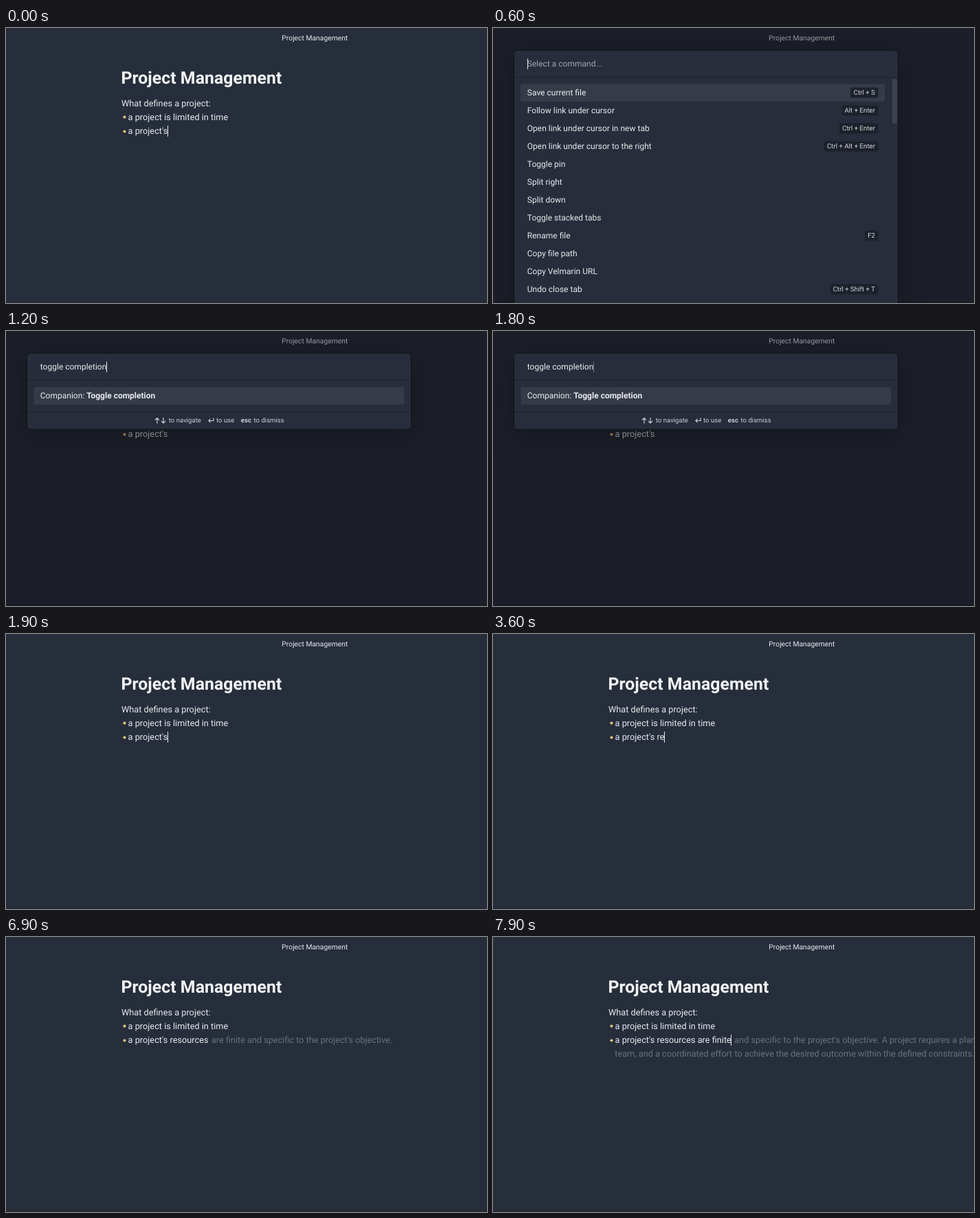
Animation of 700x400 px, one loop 8 s. Source, as an HTML page:

```html
<!DOCTYPE html>
<html lang="en">
<head>
<meta charset="utf-8">
<title>Note editor</title>
<style>
  html, body { margin: 0; width: 700px; height: 400px; overflow: hidden; background: #272e3b; }
  svg { display: block; }
  text { font-family: Roboto, sans-serif; text-rendering: geometricPrecision; white-space: pre; fill: #e8eaee; }
  .body { font-size: 12.75px; }
  .ghost { fill: #6a717e; font-size: 12.7px; }
  .item { font-size: 12.03px; }
  .key { font-size: 9.7px; fill: #d3d6dd; }
  .hint { font-size: 9.6px; fill: #c8ccd4; }
  .box { fill: #272d3a; stroke: #11141b; }
  .rule { stroke: #1d212b; }
  .row { fill: #363b48; }
  .caret { fill: #e8eaee; }
  .arrow { fill: none; stroke: #c9cdd5; stroke-width: 1.2; }
  #palette { filter: drop-shadow(0 8px 22px rgba(0, 0, 0, .25)); }
</style>
</head>
<body>
<svg width="700" height="400" viewBox="0 0 700 400">
  <rect width="700" height="400" fill="#272e3b"/>
  <rect y="398.5" width="700" height="1.5" fill="#212632"/>
  <text x="401.3" y="18.2" font-size="10.35">Project Management</text>
  <text x="167.5" y="81.1" font-size="24.9" font-weight="700" style="fill:#f3f4f6">Project Management</text>
  <g class="body">
    <text x="168" y="114">What defines a project:</text>
    <text x="177.6" y="133.9">a project is limited in time</text>
    <text x="177.6" y="154.4"><tspan id="typed"></tspan><tspan id="ghost" class="ghost" dx="1.3"></tspan></text>
    <text x="177.3" y="173.8" id="ghost2" class="ghost"></text>
  </g>
  <g fill="#dfc37c"><circle cx="172.5" cy="129.6" r="2.1"/><circle cx="172.5" cy="150.5" r="2.1"/></g>
  <rect id="caret" class="caret" y="142" width="1" height="16"/>

  <g id="overlay">
    <rect width="700" height="400" fill="#0a030a" opacity=".35"/>
    <g id="palette">
      <rect id="frame" class="box" x="30.5" y="32.5" width="559" rx="5"/>
      <path class="rule" d="M31 71.5H589"/>
      <text id="query" class="item" x="49.8" y="56.2"></text>
      <rect id="queryCaret" class="caret" y="44.5" width="1" height="15.5"/>
      <g id="all"></g>
      <g id="found">
        <rect class="row" x="40.5" y="81.5" width="539" height="25.5" rx="3"/>
        <text class="item" x="49.8" y="98.2">Companion: <tspan font-weight="700">Toggle completion</tspan></text>
        <path class="rule" d="M31 117.5H589"/>
        <path class="arrow" d="M220 134.5v-8M217 129.5l3-3 3 3M229 126v8M226 131l3 3 3-3M302 126.5v4h-7M297.5 128l-2.5 2.5 2.5 2.5"/>
        <g class="hints"></g>
      </g>
    </g>
  </g>
</svg>
<script>
const $ = id => document.getElementById(id);

const commands = [
  ['Save current file', 'Ctrl + S', 520], ['Follow link under cursor', 'Alt + Enter', 508],
  ['Open link under cursor in new tab', 'Ctrl + Enter', 504],
  ['Open link under cursor to the right', 'Ctrl + Alt + Enter', 482],
  ['Toggle pin'], ['Split right'], ['Split down'], ['Toggle stacked tabs'],
  ['Rename file', 'F2', 541], ['Copy file path'], ['Copy Velmarin URL'],
  ['Undo close tab', 'Ctrl + Shift + T', 491]
];

$('all').innerHTML =
  '<rect class="row" x="40" y="81.5" width="530" height="25.5" rx="3"/>' +
  '<rect x="581" y="74" width="7" height="65" rx="3" fill="#3d424e"/>' +
  commands.map(([name, key, left], i) => {
    const y = 94 + 26 * i;
    return `<text class="item" x="49.8" y="${y + 4.2}">${name}</text>` + (key ?
      `<rect x="${left}" y="${y - 7.5}" width="${560.5 - left}" height="15" rx="3" fill="#1d212b"/>
       <text class="key" x="556" y="${y + 3.2}" text-anchor="end">${key}</text>` : '');
  }).join('');

document.querySelector('.hints').innerHTML =
  [[236.8, 'to navigate'], [306, 'to use'], [341.8, 'esc', 700], [360.5, 'to dismiss']]
    .map(([x, s, w = 400]) => `<text class="hint" x="${x}" y="133.3" font-weight="${w}">${s}</text>`).join('');

// Each track is a list of [start time, value]; values hold until the next start.
const tracks = {
  caret: [[0, 1], [2400, .5], [2500, 0], [3100, 1], [5300, .4], [5400, 0],
    [5900, .6], [6000, 1], [6600, 0], [7100, 1]],
  overlay: [[0, 0], [400, .7], [500, 1], [1900, 0]],
  queryCaret: [[0, 1], [1400, .35]],
  letters: [[0, 0], [3200, 1], [3400, 2], [3500, 3], [3700, 4], [3900, 5], [4100, 6], [4200, 7],
    [4400, 8], [4500, 9], [4800, 10], [7100, 14], [7800, 21]]
};
const at = (name, t) => tracks[name].findLast(([start]) => start <= t)[1];

const start = "a project's";
const sentence = " resources are finite and specific to the project's objective.";
const more = ' A project requires a plan, a dedicated';
const nextLine = 'team, and a coordinated effort to achieve the desired outcome within the defined constraints.';

function draw(t) {
  const n = at('letters', t), long = t >= 7100;
  $('typed').textContent = start + sentence.slice(0, n);
  $('ghost').textContent = t < 6800 ? '' : sentence.slice(n) + (long ? more : '');
  $('ghost2').textContent = long ? nextLine : '';
  const open = at('overlay', t);
  $('caret').setAttribute('x', Math.round(177.3 + $('typed').getComputedTextLength() - .3));
  $('caret').setAttribute('opacity', open ? 0 : at('caret', t));

  const filtered = t >= 1200;
  $('overlay').setAttribute('opacity', open);
  $('frame').setAttribute('height', filtered ? 110.5 : 420);
  $('all').style.display = filtered ? 'none' : '';
  $('found').style.display = filtered ? '' : 'none';
  $('query').textContent = filtered ? 'toggle completion' : 'Select a command...';
  $('query').style.fill = filtered ? '' : '#a0a4ae';
  $('queryCaret').setAttribute('x', filtered ? 146 : 50);
  $('queryCaret').setAttribute('opacity', at('queryCaret', t));
}

const origin = performance.now();
function tick() {
  draw((performance.now() - origin) % 8000);
  requestAnimationFrame(tick);
}
tick();
</script>
</body>
</html>
```
